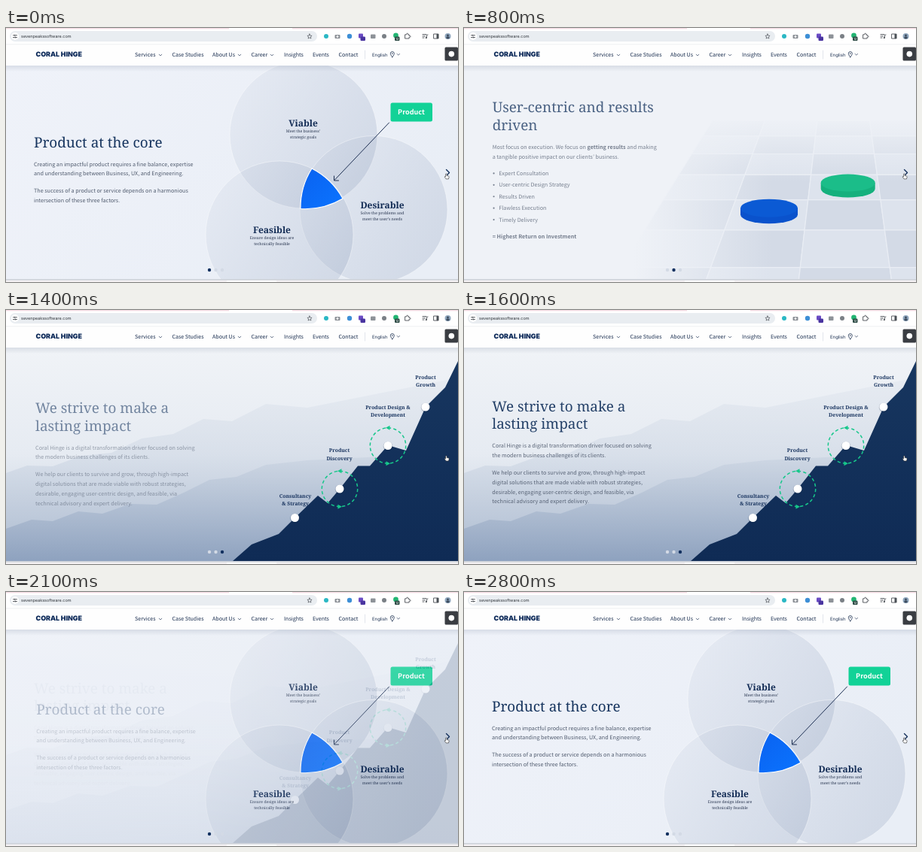
Write an HTML page that moves like this. It is 600 px wide and 338 px high and loops after 2900 ms.

```html
<!DOCTYPE html>
<html lang="en">
<head>
<meta charset="utf-8">
<title>Hero carousel</title>
<style>
html, body { margin: 0; width: 100%; height: 100%; overflow: hidden; background: #fff; }
svg { display: block; width: 600px; height: 338px; }
text { text-rendering: geometricPrecision; white-space: pre; }
.sans { font-family: "Noto Sans CJK JP", "Noto Sans CJK SC", "Noto Sans CJK", "Noto Sans", sans-serif; font-size: 7.2px; }
.serif { font-family: "Noto Serif", serif; }
.ui { font-family: Inter, Roboto, sans-serif; }
.h { font-size: 18.9px; font-weight: 500; fill: #17355f; }
.p { fill: #505b6e; }
.sans.nav { font-size: 7.1px; fill: #1b2f50; }
.big { font-size: 12px; font-weight: 700; fill: #132c55; }
.small { font-size: 5.2px; fill: #2b3852; }
.tag { font-size: 6.8px; font-weight: 600; fill: #1a3560; }
.mid { text-anchor: middle; }
.line { fill: none; stroke-linecap: round; stroke-linejoin: round; }
</style>
</head>
<body>
<svg id="stage" viewBox="0 0 600 338">
  <defs>
    <linearGradient id="sky1" x2="1" y2=".4"><stop stop-color="#eff2f9"/><stop offset="1" stop-color="#e9eef6"/></linearGradient>
    <linearGradient id="disk" x1="0" y1=".1" x2="1" y2=".7"><stop stop-color="#6c80a4" stop-opacity=".05"/><stop offset="1" stop-color="#6c80a4" stop-opacity=".19"/></linearGradient>
    <linearGradient id="core" x2="1" y2="1"><stop stop-color="#0a62f0"/><stop offset="1" stop-color="#0b74ff"/></linearGradient>
    <linearGradient id="mistX" gradientUnits="userSpaceOnUse" x1="225" x2="410"><stop stop-color="#eff2f7"/><stop offset="1" stop-color="#eff2f7" stop-opacity="0"/></linearGradient>
    <linearGradient id="mistY" gradientUnits="userSpaceOnUse" x1="0" y1="115" x2="0" y2="205"><stop stop-color="#eff2f7"/><stop offset="1" stop-color="#eff2f7" stop-opacity="0"/></linearGradient>
    <linearGradient id="sky3" x2="0" y2="1"><stop stop-color="#f0f3f7"/><stop offset=".5" stop-color="#e6ebf2"/><stop offset="1" stop-color="#bcc8d9"/></linearGradient>
    <linearGradient id="ridge" x2="0" y2="1"><stop stop-color="#c3cedd" stop-opacity=".4"/><stop offset="1" stop-color="#869bba" stop-opacity=".78"/></linearGradient>
    <linearGradient id="peak" x2="0" y2="1"><stop stop-color="#17365f"/><stop offset="1" stop-color="#0f2b55"/></linearGradient>
    <linearGradient id="drop" x2="0" y2="1"><stop stop-color="#8793a8" stop-opacity=".22"/><stop offset="1" stop-color="#8793a8" stop-opacity="0"/></linearGradient>
    <clipPath id="view"><rect y="50" width="600" height="284"/></clipPath>
  </defs>
  <g id="deck" clip-path="url(#view)"></g>
  <g id="chrome"></g>
</svg>
<script>
const $ = id => document.getElementById(id);
const text = (x, y, cls, str, extra = '') => `<text x="${x}" y="${y}" class="${cls}" ${extra}>${str}</text>`;
const rect = (x, y, w, h, fill, r = 0) => `<rect x="${x}" y="${y}" width="${w}" height="${h}" rx="${r}" fill="${fill}"/>`;
const dot = (x, y, r, fill, extra = '') => `<circle cx="${x}" cy="${y}" r="${r}" fill="${fill}" ${extra}/>`;
const line = (d, stroke, w = 1, extra = '') => `<path class="line" d="${d}" stroke="${stroke}" stroke-width="${w}" ${extra}/>`;
const fill = (d, color, extra = '') => `<path d="${d}" fill="${color}" ${extra}/>`;
const lines = (x, cls, rows) => rows.map(([y, s]) => text(x, y, cls, s)).join('');
const copy = body => `<g class="copy">${body}</g>`;

function venn() {
  const ring = ([x, y]) => dot(x, y, 98, 'url(#disk)', 'stroke="#fff" stroke-opacity=".5" stroke-width=".8"');
  const label = (x, y, title, a, b) => text(x, y, 'serif big mid', title)
    + text(x, y + 7.8, 'serif small mid', a) + text(x, y + 15.6, 'serif small mid', b);
  return rect(0, 50, 600, 284, 'url(#sky1)')
    + [[395, 142], [488, 241.5], [363, 275]].map(ring).join('')
    + fill('M406 187A98 98 0 0 1 447 227A98 98 0 0 1 391 240.5A98 98 0 0 1 406 187Z', 'url(#core)', 'stroke="#fff" stroke-width="1.1"')
    + label(394.5, 131, 'Viable', 'Meet the business’', 'strategic goals')
    + label(499.5, 240, 'Desirable', 'Solve the problems and', 'meet the user’s needs')
    + label(353, 273, 'Feasible', 'Ensure design ideas are', 'technically feasible')
    + line('M508.500 126L436 202.500M435.500 197V203H441.500', '#1d2f52', 1)
    + rect(510.5, 99.5, 55.5, 25, '#12d297', 2.5)
    + text(538, 115.3, 'sans mid', 'Product', 'style="font-size:9.100px" font-weight="700" fill="#fff"')
    + copy(text(37, 159, 'serif h', 'Product at the core')
      + lines(37, 'sans p', [
        [183.5, 'Creating an impactful product requires a fine balance, expertise'],
        [196.3, 'and understanding between Business, UX, and Engineering.'],
        [219.1, 'The success of a product or service depends on a harmonious'],
        [232, 'intersection of these three factors.']]));
}

function floor() {
  // Square tiles seen in one-point perspective
  const vx = 501, vy = -153, cell = .252;
  const row = k => vy + 1 / (.00337 - k * .00025);
  const px = (c, y) => vx + (c - .46) * cell * (y - vy);
  let tiles = '';
  for (let r = -1; r < 6; r++) for (let c = -2; c < 3; c++) {
    const a = row(r), b = row(r + 1);
    tiles += fill(`M${px(c, a)} ${a}H${px(c + 1, a)}L${px(c + 1, b)} ${b}H${px(c, b)}Z`,
      (r + c) & 1 ? '#d3dae6' : '#dde3ed', 'stroke="#e9edf4" stroke-width="1.2"');
  }
  const puck = (x, y, rx, ry, h, top, side) =>
    fill(`M${x - rx} ${y}V${y + h}A${rx} ${ry} 0 0 0 ${x + rx} ${y + h}V${y}Z`, side)
    + `<ellipse cx="${x}" cy="${y}" rx="${rx}" ry="${ry}" fill="${top}"/>`;
  const items = ['Expert Consultation', 'User-centric Design Strategy', 'Results Driven', 'Flawless Execution', 'Timely Delivery'];
  return rect(0, 50, 600, 284, '#eff2f7') + tiles
    + rect(120, 110, 290, 224, 'url(#mistX)') + rect(200, 110, 400, 95, 'url(#mistY)')
    + puck(509.7, 206, 36, 11.5, 8, '#1bbd89', '#15b07d')
    + puck(405, 239.7, 38, 12, 8.5, '#0b5ad4', '#0a52cc')
    + copy(lines(36.5, 'serif h', [[111, 'User-centric and results'], [134.5, 'driven']])
      + lines(36.5, 'sans p', [
        [159.8, 'Most focus on execution. We focus on <tspan font-weight="700">getting results</tspan> and making'],
        [172.4, 'a tangible positive impact on our clients’ business.']])
      + items.map((s, i) => dot(38.4, 192 + i * 15.4, 1.1, '#505b6e') + text(45.2, 194.6 + i * 15.4, 'sans p', s)).join('')
      + text(36.5, 279, 'sans p', '= Highest Return on Investment', 'font-weight="700"'));
}

function climb() {
  const green = '#17c78b';
  const orbit = (x, y) => dot(x, y, 23.7, 'none', `stroke="${green}" stroke-width="1.5" stroke-dasharray="4.2 3.200"`)
    + fill(`M${x - 3} ${y - 23.7}l5.500 -3v6z`, green) + fill(`M${x + 3} ${y + 23.7}l-5.500 -3v6z`, green);
  const node = (x, y) => dot(x, y + .8, 6.3, '#0a1c3a', 'opacity=".2"') + dot(x, y, 5.5, '#fff');
  const tag = (x, y, a, b) => text(x, y, 'serif tag mid', a) + text(x, y + 10.6, 'serif tag mid', b);
  return rect(0, 50, 600, 284, 'url(#sky3)')
    + fill('M0 217L28 207L62 208L100 194L140 190L180 171L222 165L262 145L300 148L345 125L400 130L600 90V334H0Z', 'url(#ridge)', 'opacity=".4"')
    + fill('M0 291L34 279L62 281L96 268L128 271L165 258L200 259L236 243L270 226L306 222L345 206L400 200L600 190V334H0Z', 'url(#ridge)')
    + fill('M301 334L326 312L362 298L384 276L414 247L427 257L443 238L467 207.500H483L507 180L531 187L557 129L583 103L600 68V334Z', 'url(#peak)')
    + orbit(443, 238) + orbit(507, 180.5)
    + [[383.5, 276.5], [443, 238], [507, 180.5], [557, 129]].map(p => node(...p)).join('')
    + tag(384, 249.5, 'Consultancy', '&amp; Strategy') + tag(442.5, 189, 'Product', 'Discovery')
    + tag(507, 131.5, 'Product Design &amp;', 'Development') + tag(557, 91.5, 'Product', 'Growth')
    + copy(lines(37, 'serif h', [[134.5, 'We strive to make a'], [158, 'lasting impact']])
      + lines(37, 'sans p', [
        [183, 'Coral Hinge is a digital transformation driver focused on solving'],
        [195.8, 'the modern business challenges of its clients.'],
        [218.6, 'We help our clients to survive and grow, through high-impact'],
        [231.4, 'digital solutions that are made viable with robust strategies,'],
        [244.2, 'desirable, engaging user-centric design, and feasible, via'],
        [257, 'technical advisory and expert delivery.']]));
}

function chrome() {
  const grey = '#4b5056', ink = '#1b2f50';
  const down = (x, y) => line(`M${x - 1.8} ${y - .8}l1.800 1.700l1.800 -1.700`, ink, .65);
  const nav = [[171, 'Services', 205], [220.5, 'Case Studies'], [274, 'About Us', 310], [325.5, 'Career', 353],
    [369, 'Insights'], [407, 'Events'], [441.5, 'Contact']];
  const badge = (x, color) => rect(x, 11.5, 6.5, 5.5, color, 1.2);
  return rect(0, 0, 600, 22, '#fff') + rect(0, 0, 296, 1.3, '#f5dbe3') + rect(380, 0, 220, 1.3, '#f5dbe3')
    + rect(5, 4, 408, 14, '#e9edf1', 7) + dot(12, 11, 5, '#fff')
    + line('M9.500 9.700H11M13 9.700H14.500M9.500 12.500H11M13 12.500H14.500', grey, .9)
    + dot(11.8, 9.7, .9, grey) + dot(12.2, 12.5, .9, grey)
    + text(20, 13.2, 'ui', 'sevenpeakssoftware.com', 'font-size="5.500" fill="#30353b"')
    + line('M403 8l.9 2.100l2.200 .2l-1.700 1.500l.5 2.200l-1.900 -1.200l-1.900 1.200l.5 -2.200l-1.700 -1.500l2.200 -.2z', grey, .7)
    + dot(425, 11, 3, '#2bb8c4')
    + rect(436.5, 9, 7, 5, '#8b9096', 1) + dot(440, 11.5, 1.4, '#fff')
    + dot(456, 11, 3.2, '#3d8fd6')
    + rect(468, 7.5, 6, 6, '#6a4bc4', 1) + badge(470.5, '#4a35a0')
    + rect(484, 8.5, 6.5, 5.5, '#8d9298', 1) + dot(502, 11, 3, '#7a8086')
    + dot(517.5, 10, 3.4, '#22b573') + badge(516, '#2c4a44')
    + text(519.2, 16, 'ui mid', '12', 'font-size="4" fill="#fff"')
    + line('M530 8.800h1.700a1.100 1.100 0 1 1 1.900 0h1.500v1.700a1.100 1.100 0 1 1 0 1.600v1.900h-5.100z', grey, .9)
    + line('M553 8.500h5M553 10.800h3.500M553 13h2M558.500 13V9.500l1.500 -.5', grey, .9) + dot(557.8, 13, 1.1, grey)
    + line('M568 8h6v6h-6z', grey, .9) + rect(571.5, 8, 2.6, 6, grey)
    + dot(586.5, 11, 4, '#8fa6bd') + dot(586.5, 10, 1.4, '#3b4a5c') + rect(584.4, 11.6, 4.2, 2.6, '#3b4a5c', 1.2)
    + rect(0, 21.5, 600, 28.5, '#fefefe') + line('M0 21.700H600', '#e4e7ec', .6) + rect(0, 50, 600, 8, 'url(#drop)')
    + text(39.5, 38.3, 'ui', 'CORAL HINGE', 'font-size="8.900" font-weight="900" fill="#0e2b5a"')
    + nav.map(([x, s, c]) => text(x, 38, 'sans nav', s) + (c ? down(c, 36) : '')).join('')
    + line('M476.500 30V41', '#d5dae2', .7)
    + text(486, 37.5, 'ui', 'English', `font-size="6" fill="${ink}"`)
    + line('M512.800 38.800C510.800 36 510.300 35 510.300 34A2.500 2.500 0 0 1 515.300 34C515.300 35 514.800 36 512.800 38.800Z', ink, .8)
    + dot(512.8, 34, .8, ink) + down(520.8, 35.2)
    + rect(582.5, 25.5, 17.5, 18, '#3a3d42', 1.5) + dot(591.3, 34.6, 3.8, '#fff')
    + rect(0, 334, 600, 4, '#f4f1f3') + rect(0, 334, 600, 1.8, '#d0d5dc') + rect(293, 336, 66, 2, '#fff')
    + [270, 278.5, 287].map(x => dot(x, 322, 2.2, '#d3dae5', 'class="pip"')).join('')
    + line('M584.500 188.500l4 4l-4 4', '#122e59', 1.4)
    + fill('M583.600 194.300q.9 -.9 1.600 .2v2l2.300 .6q.8 .3 .6 1.300l-.7 2.500h-3.300l-2 -2.800q.2 -1.100 1.500 -.2z', '#fff', 'stroke="#222" stroke-width=".6"');
}

$('deck').innerHTML = [venn, floor, climb].map(draw => `<g>${draw()}</g>`).join('');
$('chrome').innerHTML = chrome();

const slides = [...$('deck').children];
const copies = slides.map(s => s.querySelector('.copy'));
const pips = [...document.querySelectorAll('.pip')];
const LOOP = 2900, STEP = 100, FADE = 220, RISE = 540;
const cues = [[390, 1], [1095, 2], [1920, 0]]; // start time, slide shown
const ramp = (t, span) => Math.min(1, Math.max(0, t / span));

function show(ms) {
  const t = Math.floor((ms % LOOP) / STEP) * STEP;
  const [start, now] = cues.filter(c => c[0] <= t).pop() || [-LOOP, 0];
  const last = (now + 2) % 3;
  const p = ramp(t - start, FADE), q = ramp(t - start, RISE);
  if ($('deck').lastChild !== slides[now]) $('deck').append(slides[now]);
  slides.forEach((s, i) => {
    s.style.opacity = i === now ? p : i === last && p < 1 ? 1 : 0;
    const rise = i === now ? 6 * (1 - q) : 0;
    copies[i].style.opacity = i === now ? q : 1 - p;
    copies[i].setAttribute('transform', `translate(${rise * .8} ${rise})`);
    pips[i].setAttribute('fill', i === now ? '#12305f' : '#d3dae5');
  });
}

const t0 = performance.now();
function tick() {
  show(performance.now() - t0);
  requestAnimationFrame(tick);
}
tick();
</script>
</body>
</html>
```
